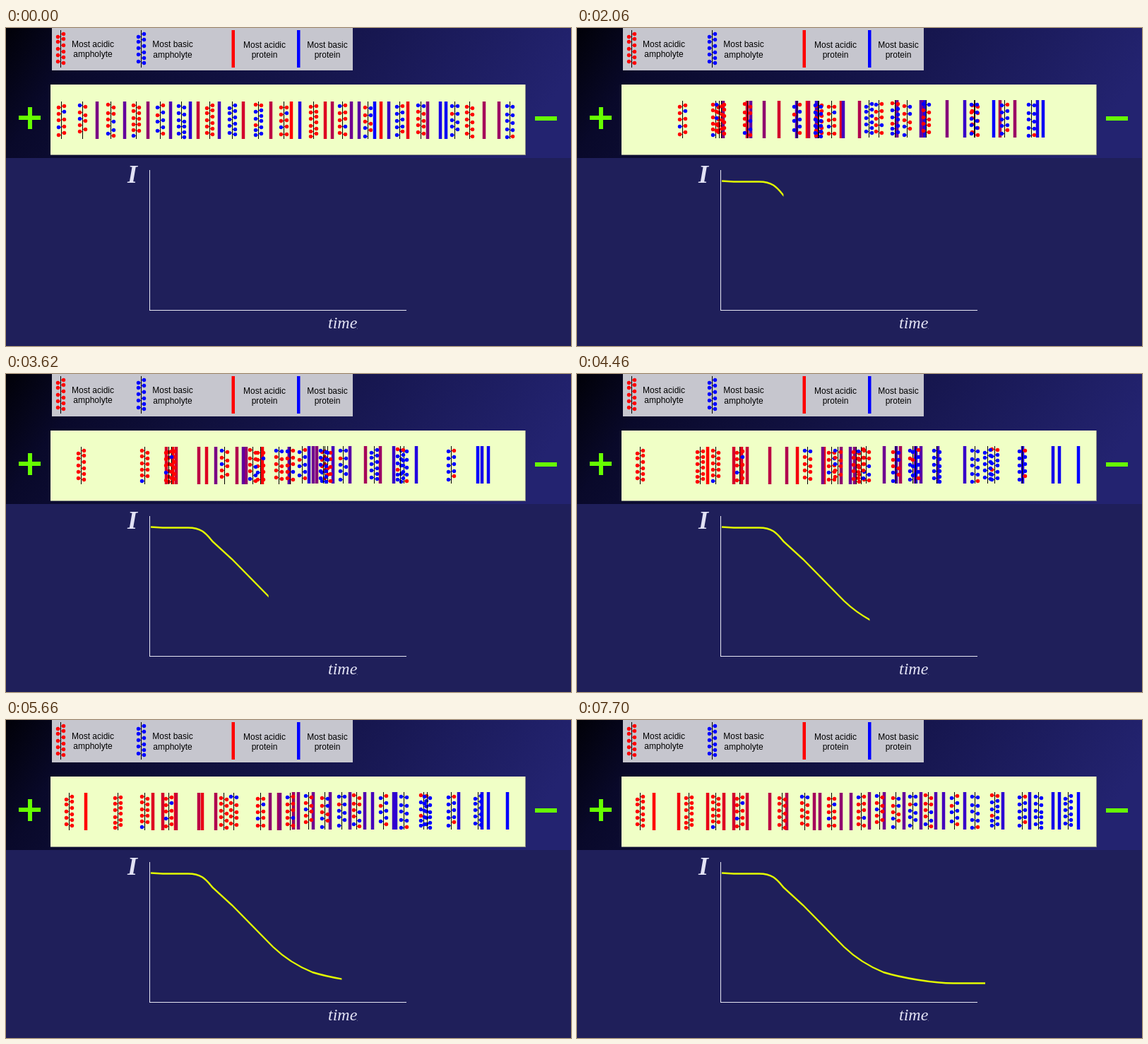
Recreate the animation shown at these times as an HTML page with a canvas. Size 800x450 px, loop 8 s.

```html
<!DOCTYPE html>
<html lang="en">
<head>
<meta charset="utf-8">
<title>Isoelectric focusing</title>
<style>
  html, body { margin: 0; width: 100%; height: 100%; overflow: hidden; background: #1f1f5a; }
  canvas { display: block; width: 100%; height: 100%; }
</style>
</head>
<body>
<canvas id="stage" width="800" height="450"></canvas>
<script>
const ctx = document.getElementById('stage').getContext('2d');
const LOOP = 8000, HOLD = 500, STEP = 120, LAST = 61;
const RED = '#ff0000', BLUE = '#0000ff', GREEN = '#66ff00';

// Where each particle starts and where its pH holds it, most acidic first.
const PROTEINS = {
  pace: 0.97,
  from: [404, 531, 569, 452, 336, 272, 375, 462, 677, 698, 201, 597,
    129, 489, 168, 500, 233, 302, 542, 261, 416, 615, 623, 522],
  to: [109, 144, 185, 208, 222, 241, 273, 297, 336, 344, 374, 388,
    414, 435, 463, 487, 508, 519, 549, 603, 641, 674, 683, 710]
};
const AMPHOLYTES = {
  pace: 1.16,
  from: [288, 435, 184, 78, 656, 587, 393, 476, 108,
    512, 635, 148, 218, 713, 357, 557, 248, 320],
  to: [89, 158, 196, 230, 290, 322, 360, 402, 428,
    451, 475, 497, 534, 563, 591, 630, 653, 695]
};
const CURVE = new Path2D('M205 216.5 L222 217.5 H258 C278 217.5 284 227 293 237.5 ' +
  'L320 262 L378 321 Q402 344 434 357 C460 365 505 372.5 533 372.5 H578');

function seeded(seed) {
  return () => (seed = (seed * 16807) % 2147483647) / 2147483647;
}

// Side groups are scattered down the spine; the share of basic ones grows with rank.
function makeGroups(rank, count) {
  const rand = seeded(7919 * (rank + 3));
  const basic = rank / (count - 1);
  const gap = 6 + 3 * rand();
  const groups = [];
  for (const side of [-1, 1]) {
    for (let y = 4 + 5 * rand(); y < 50; y += gap + 4 * rand()) {
      groups.push({ side, y: Math.round(y), color: rand() < basic ? BLUE : RED });
    }
  }
  return groups;
}

const groups = AMPHOLYTES.to.map((_, rank, all) => makeGroups(rank, all.length));

// Drift speeds up, then stays steady until the particle reaches its own place.
function position({ from, to, pace }, rank, step) {
  const start = from[rank], gap = to[rank] - start, dist = Math.abs(gap);
  const drift = 7.5 * step - 30 * (1 - Math.exp(-step / 8));
  const speed = pace * Math.min(1, 0.3 + dist / 330);
  return Math.round(start + Math.sign(gap) * Math.min(dist, drift * speed));
}

function box(color, x, y, w, h) {
  ctx.fillStyle = color;
  ctx.fillRect(x, y, w, h);
}

function text(str, x, y, font, color, align) {
  ctx.font = font;
  ctx.fillStyle = color;
  ctx.textAlign = align;
  ctx.fillText(str, x, y);
}

function label(x, y, first, second, gap = 14) {
  const font = '12px "Liberation Sans", Arial, sans-serif';
  text(first, x, y, font, '#000', 'center');
  text(second, x, y + gap, font, '#000', 'center');
}

function drawAmpholyte(x, y, rank) {
  box('#000', x, y, 1, 53);
  for (const { side, y: dy, color } of groups[rank]) {
    box(color, side < 0 ? x - 4 : x + 1, y + dy, 4, 1);
    ctx.beginPath();
    ctx.arc(x + 0.5 + 4 * side, y + dy + 0.5, 2.7, 0, Math.PI * 2);
    ctx.fill();
  }
}

function drawBackdrop() {
  box('#1f1f5a', 0, 0, 800, 450);
  const sky = ctx.createLinearGradient(0, 0, 560, 400);
  sky.addColorStop(0, '#010108');
  sky.addColorStop(0.15, '#09092a');
  sky.addColorStop(0.5, '#131346');
  sky.addColorStop(1, '#232370');
  box(sky, 0, 0, 800, 184);
  box('#c6c6ce', 65, 0, 426, 60);
  box('#8d9286', 63, 80, 673, 100);
  box('#f0ffc6', 63, 80, 672, 99);
  box(GREEN, 18, 124, 31, 6);
  box(GREEN, 31, 112, 6, 31);
  box(GREEN, 749, 125, 31, 6);
}

function drawLegend() {
  drawAmpholyte(77, 3, 0);
  drawAmpholyte(191, 3, groups.length - 1);
  box(RED, 319.5, 3, 4.5, 53);
  box(BLUE, 412, 3, 4.5, 53);
  label(123, 27, 'Most acidic', 'ampholyte');
  label(236, 27, 'Most basic', 'ampholyte', 15);
  label(366, 28, 'Most acidic', 'protein');
  label(455, 28, 'Most basic', 'protein');
}

function drawGraph(step) {
  const serif = 'px "Liberation Serif", "Times New Roman", serif';
  box('#e6e6f2', 203, 201, 1, 199);
  box('#e6e6f2', 203, 399, 364, 1);
  text('I', 172, 219, 'italic bold 36' + serif, '#e2e2f4', 'left');
  text('time', 456, 425, 'italic 24' + serif, '#e2e2f4', 'left');
  box('#62628c', 497, 425, 1, 1);
  if (!step) return;
  ctx.save();
  ctx.beginPath();
  ctx.rect(0, 190, 207 + 6.1 * step, 200);
  ctx.clip();
  ctx.strokeStyle = '#e2fa00';
  ctx.lineWidth = 2.4;
  ctx.stroke(CURVE);
  ctx.restore();
}

function drawGel(step) {
  const lift = Math.min(1, step / 14);
  const top = x => Math.round(104 - lift * (0.6 + x / 450));
  PROTEINS.to.forEach((_, rank, all) => {
    const x = position(PROTEINS, rank, step);
    const mix = Math.round(255 * rank / (all.length - 1));
    box(`rgb(${255 - mix},0,${mix})`, x - 2.25, top(x), 4.5, 53);
  });
  AMPHOLYTES.to.forEach((_, rank) => {
    const x = position(AMPHOLYTES, rank, step);
    drawAmpholyte(x, top(x), rank);
  });
}

function draw(now) {
  const t = now % LOOP;
  const step = t < HOLD ? 0 : Math.min(LAST, 1 + Math.floor((t - HOLD) / STEP));
  drawBackdrop();
  drawLegend();
  drawGel(step);
  drawGraph(step);
}

const start = performance.now();
function tick() {
  draw(performance.now() - start);
  requestAnimationFrame(tick);
}
tick();
</script>
</body>
</html>
```
